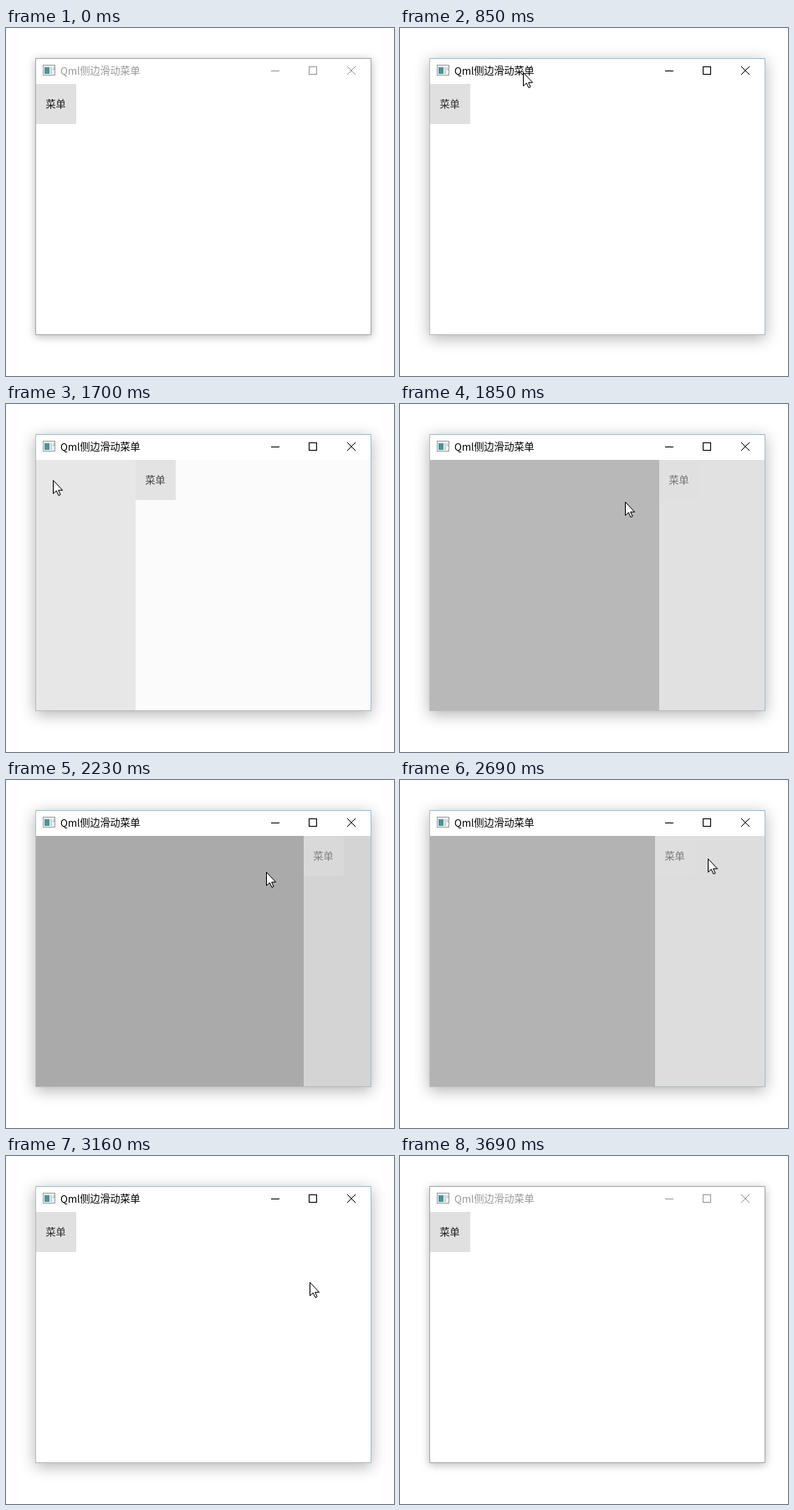
These frames come from a looping animation (464 by 417 pixels, 3770 ms). An HTML page:

```html
<!DOCTYPE html>
<html lang="zh-CN">
<head>
<meta charset="utf-8">
<style>
  html, body { margin: 0; width: 100%; height: 100%; overflow: hidden; background: #fff; }
  #win {
    position: absolute; left: 35px; top: 36px; width: 400px; height: 330px;
    border: 1px solid #aaa; background: #fff;
    box-shadow: 0 2px 10px rgba(0, 0, 0, .28);
  }
  #win.active {
    border-color: #9cc4d8 #9cc4d8 #b4bcc0 #b4c0c4;
    box-shadow: 0 4px 17px rgba(0, 0, 0, .3);
  }
  svg { position: absolute; left: 0; top: 0; }
  text { font: 12px "Noto Sans CJK SC", "Noto Sans CJK", "Noto Sans", sans-serif; }
  #bar { color: #999; }
  .active + svg #bar { color: #000; }
  #label { fill: #1c1c1c; }
  .active + svg #label { fill: #2c2c2c; }
</style>
</head>
<body>
<div id="win"></div>
<svg width="464" height="417">
  <clipPath id="clip"><rect x="36" y="67" width="400" height="300"/></clipPath>

  <g id="bar">
    <g shape-rendering="crispEdges">
      <rect x="44.5" y="44.5" width="14" height="12" fill="#f4f6f6" stroke="#9aa0a0"/>
      <rect x="46" y="47" width="6" height="8" fill="#4f9298"/>
      <path d="M53 47h2v8h-2zM56 47h2v4h-2z" fill="#c9d0d0"/>
    </g>
    <text x="65" y="55.6" fill="currentColor">Qml侧边滑动菜单</text>
    <g fill="none" stroke="currentColor">
      <path d="M317 51.5h10M362.5 46.5h9v9h-9z" shape-rendering="crispEdges"/>
      <path d="M408 46l10 10M418 46l-10 10"/>
    </g>
  </g>

  <g clip-path="url(#clip)">
    <rect id="back" x="36" y="67" width="400" height="300"/>
    <g id="view">
      <rect width="400" height="300" fill="#fff"/>
      <rect width="48" height="48" fill="#e0e0e0"/>
      <text id="label" x="11.5" y="28.6">菜单</text>
    </g>
  </g>

  <path id="cursor" d="M.5.5v16l3.8-3.5 2.6 5.6 2.2-1-2.5-5.3h5z" fill="#fff" stroke="#000"/>
</svg>
<script>
const LOOP = 3770, STEP = 77;
const $ = id => document.getElementById(id);
const clamp = v => Math.max(0, Math.min(1, v));

// Pointer path: step, x, y
const path = [
  [1, 369, 365], [2, 282, 238], [3, 213, 152], [4, 184, 127], [5, 184, 127],
  [8, 152, 62], [11, 147, 53], [12, 138, 54], [14, 84, 78], [15, 58, 93],
  [16, 49, 96], [17, 56, 91], [22, 56, 91], [24, 269, 117], [27, 283, 118],
  [33, 368, 94], [37, 368, 94], [41, 363, 151], [42, 372, 190],
  [43, 398, 280], [44, 443, 390]
];

function pointer(k) {
  const i = path.findIndex(p => p[0] >= k);
  if (i < 0 || k < path[0][0]) return null;
  const b = path[i], a = path[i - 1] || b;
  const u = a === b ? 0 : (k - a[0]) / (b[0] - a[0]);
  return [1, 2].map(n => Math.round(a[n] + (b[n] - a[n]) * u));
}

function draw(now) {
  // The picture advances in whole steps, about 13 per second.
  const k = Math.floor((now % LOOP + 7) / STEP);
  const slide = clamp(Math.min(.372 + .242 * (k - 22), .84 - .273 * (k - 35)));
  const fade = clamp(Math.min(.28 + .277 * (k - 22), .894 - .247 * (k - 35)));

  $('win').className = k >= 9 && k < 48 ? 'active' : '';
  const grey = Math.round(255 - 85 * fade);
  $('back').setAttribute('fill', `rgb(${grey},${grey},${grey})`);
  $('view').setAttribute('transform', `translate(${36 + Math.round(320 * slide)} 67)`);
  // Each child fades on its own, not as a group.
  for (const el of $('view').children) el.setAttribute('opacity', 1 - fade / 2);

  const at = pointer(k);
  $('cursor').style.display = at ? '' : 'none';
  if (at) $('cursor').setAttribute('transform', `translate(${at})`);
}

const start = performance.now();
(function tick() {
  draw(performance.now() - start);
  requestAnimationFrame(tick);
})();
</script>
</body>
</html>
```
